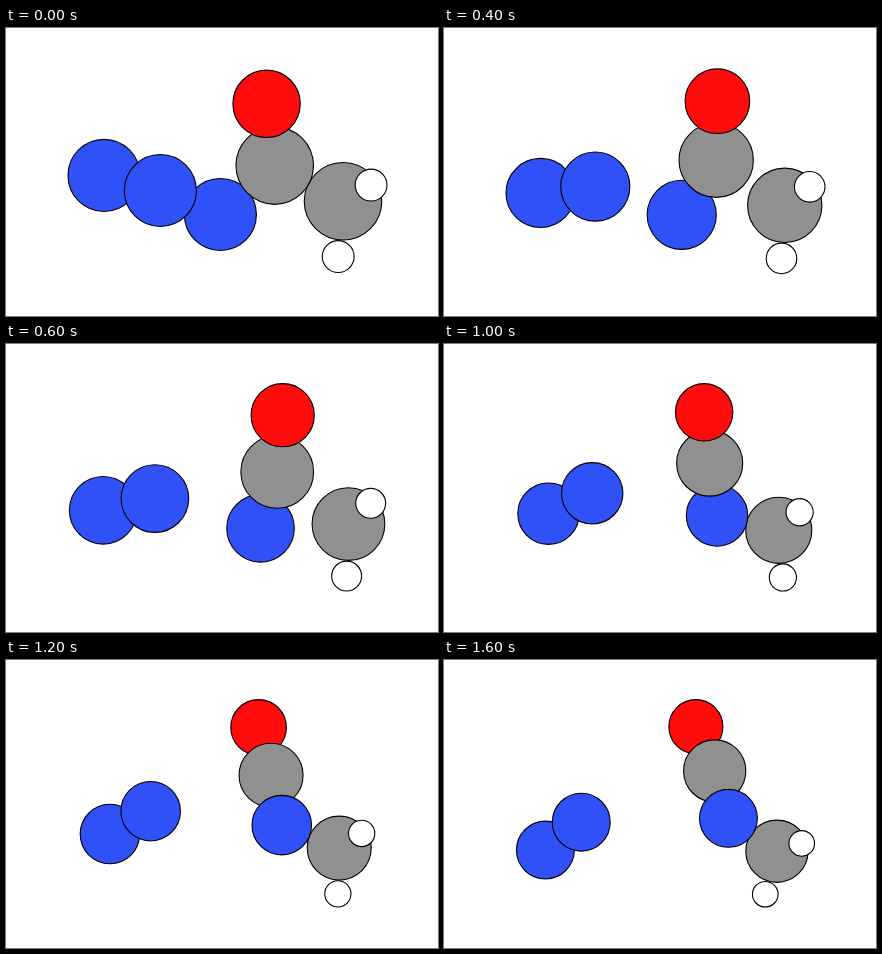
Recreate the animation shown at these times as an HTML page with a canvas. Size 432x288 px, loop 1800 ms.

```html
<!DOCTYPE html>
<html lang="en">
<head>
<meta charset="utf-8">
<title>Molecule rearrangement</title>
<style>
html, body { margin: 0; width: 100%; height: 100%; overflow: hidden; background: #fff; }
canvas { display: block; }
</style>
</head>
<body>
<canvas id="stage" width="432" height="288"></canvas>
<script>
const ctx = document.getElementById('stage').getContext('2d');
const STEP_MS = 200, STEPS = 9;
const VIEW = { x: 221.5, y: 143.3, width: 319, height: 207.4 };

// All model lengths are in nitrogen radii.
const NITROGEN = { fill: '#3050f8', radius: 1 };
const CARBON = { fill: '#909090', radius: 1.076 };
const OXYGEN = { fill: '#ff0d0d', radius: 0.935 };
const HYDROGEN = { fill: '#fff', radius: 0.442 };

// Piecewise linear track through [step, value] points, held at both ends.
const track = (...keys) => t => {
  const next = keys.findIndex(([time]) => time >= t);
  if (next < 0) return keys[keys.length - 1][1];
  if (next === 0) return keys[0][1];
  const [t0, a] = keys[next - 1], [t1, b] = keys[next];
  return a + (b - a) * (t - t0) / (t1 - t0);
};
const fixed = value => () => value;
const ease = (from, to, duration) => t => {
  const u = Math.min(t / duration, 1);
  return from + (to - from) * u * u * (3 - 2 * u);
};

// Each atom hangs from its parent at a distance and an angle in degrees.
const ATOMS = {
  carbonyl: { element: CARBON },
  oxygen: {
    element: OXYGEN, parent: 'carbonyl',
    distance: track([1, 1.73], [4, 1.665]),
    angle: track([0, -97.5], [3, -84.5], [5, -96.2], [7, -113])
  },
  amide: {
    element: NITROGEN, parent: 'carbonyl',
    distance: track([0, 2.03], [1, 2], [3, 1.74], [7, 1.705]),
    angle: track([1, 138], [3, 106.5], [5, 82], [7, 73.8])
  },
  methylene: {
    element: CARBON, parent: 'carbonyl',
    distance: ease(2.14, 3.51, 7.6),
    angle: track([0, 27.6], [3, 36.2], [5, 44.2], [8, 52.2])
  },
  sideHydrogen: {
    element: HYDROGEN, parent: 'methylene',
    distance: fixed(0.9),
    angle: track([1, -30], [3, -43], [5, -41], [8, -17.5])
  },
  lowHydrogen: {
    element: HYDROGEN, parent: 'methylene',
    distance: fixed(1.54),
    angle: track([1, 95], [3, 92], [5, 85], [8, 105.2])
  },
  innerNitrogen: {
    element: NITROGEN, parent: 'carbonyl',
    distance: track([0, 3.25], [1, 3.46], [5, 3.95], [7, 4.5], [8, 4.94]),
    angle: track([3, 167.7], [5, 165.6], [8, 159])
  },
  outerNitrogen: {
    element: NITROGEN, parent: 'innerNitrogen',
    distance: track([1, 1.62], [3, 1.57]),
    angle: track([0, 195], [1, 179.5], [5, 155], [8, 142.2])
  }
};

// Back to front, before and after the product turns.
const FRAGMENTS = ['outerNitrogen', 'innerNitrogen', 'sideHydrogen', 'lowHydrogen'];
const EARLY = ['methylene', 'amide', 'carbonyl', 'oxygen', ...FRAGMENTS];
const LATE = ['oxygen', 'carbonyl', 'methylene', 'amide', ...FRAGMENTS];

function buildModel(t) {
  const model = {};
  for (const [name, { element, parent, distance, angle }] of Object.entries(ATOMS)) {
    const atom = model[name] = { ...element, x: 0, y: 0 };
    if (!parent) continue;
    const direction = angle(t) * Math.PI / 180;
    atom.x = model[parent].x + distance(t) * Math.cos(direction);
    atom.y = model[parent].y + distance(t) * Math.sin(direction);
  }
  return model;
}

function extent(atoms, axis) {
  const low = Math.min(...atoms.map(a => a[axis] - a.radius));
  const high = Math.max(...atoms.map(a => a[axis] + a.radius));
  return { middle: (low + high) / 2, size: high - low };
}

function draw(t) {
  const model = buildModel(t);
  const atoms = Object.values(model);
  const across = extent(atoms, 'x'), down = extent(atoms, 'y');
  // The camera keeps the whole model centred and as large as the view allows.
  const scale = Math.min(VIEW.width / across.size, VIEW.height / down.size);

  ctx.clearRect(0, 0, 432, 288);
  ctx.strokeStyle = '#000';
  ctx.lineWidth = 1.1;
  for (const name of t > 5 ? LATE : EARLY) {
    const { x, y, radius, fill } = model[name];
    ctx.beginPath();
    ctx.arc(VIEW.x + (x - across.middle) * scale, VIEW.y + (y - down.middle) * scale,
      radius * scale, 0, 2 * Math.PI);
    ctx.fillStyle = fill;
    ctx.fill();
    ctx.stroke();
  }
}

function frame() {
  draw(Math.floor(performance.now() / STEP_MS) % STEPS);
  requestAnimationFrame(frame);
}
frame();
</script>
</body>
</html>
```
